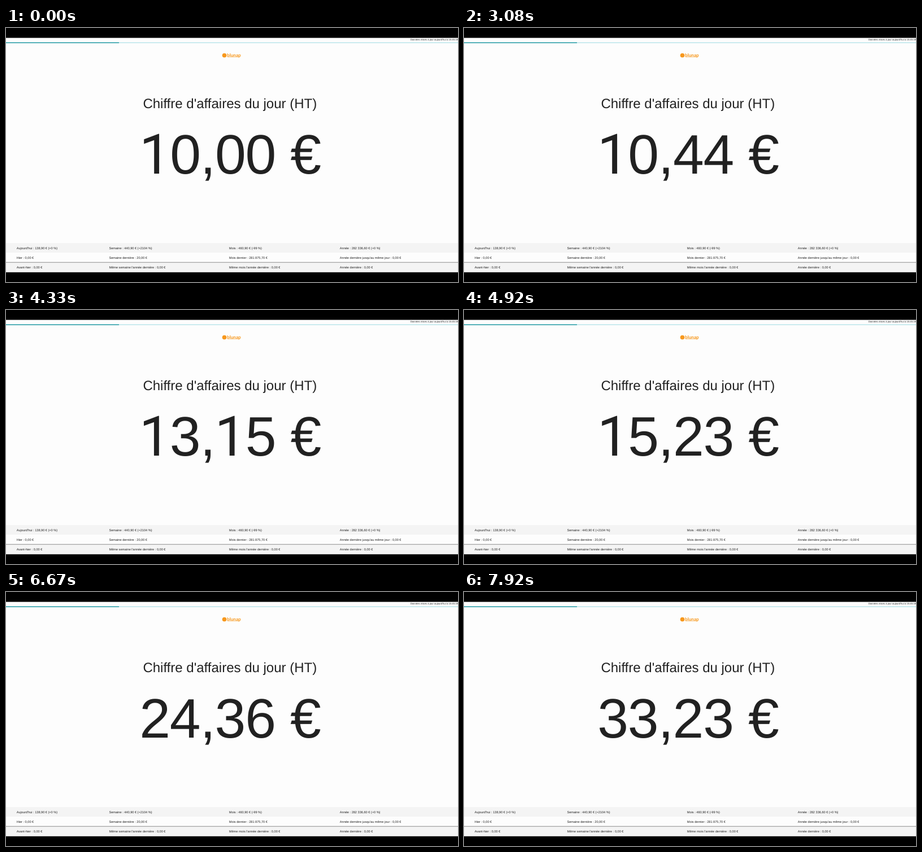
An HTML page that plays this animation: 800 px wide and 450 px high, repeating every 8000 ms.

```html
<!DOCTYPE html>
<html lang="fr">
<head>
<meta charset="utf-8">
<title>Chiffre d'affaires</title>
<style>
  html, body { margin: 0; width: 100%; height: 100%; overflow: hidden; background: #000; }
  svg { display: block; width: 800px; height: 450px; }
  text { font-family: "Liberation Sans", Arial, sans-serif; fill: #212121; text-rendering: geometricPrecision; }
  .centered { text-anchor: middle; }
  #amount { font-size: 98.5px; letter-spacing: -1.2px; }
  .one { font-family: Roboto, sans-serif; }
  #cells { font-size: 5.6px; }
  .brand { font: 700 8.2px Lato, sans-serif; fill: #f7981d; }
</style>
</head>
<body>
<svg viewBox="0 0 800 450">
  <rect y="17.5" width="800" height="415" fill="#fdfdfd"/>
  <rect y="25.4" width="800" height="1.2" fill="#a9e0e6"/>
  <rect y="25.4" width="200" height="1.4" fill="#2599a3"/>
  <text x="715.7" y="22" font-size="4.25">Données mises à jour aujourd'hui à 15:45:19</text>

  <circle cx="386.5" cy="48.5" r="3.8" fill="#f7981d"/>
  <text class="brand" x="391" y="50.5">blunap</text>
  <rect x="392" y="51.4" width="22" height=".7" fill="#f7981d" opacity=".6"/>

  <text class="centered" x="396.3" y="141.5" font-size="24">Chiffre d'affaires du jour (HT)</text>
  <text class="centered" id="amount" x="396.4" y="258.3"></text>

  <rect y="381" width="800" height="17" fill="#f4f4f4"/>
  <rect y="415" width="800" height="17.5" fill="#f4f4f4"/>
  <rect y="414.7" width="800" height="1" fill="#8c8c8c"/>
  <g id="cells"></g>
</svg>
<script>
const LOOP = 8000, FRAME = 1000 / 12;
const COUNT_START = 2335.3, COUNT_TIME = 19996, FROM = 10, TO = 138.9;

const columns = [
  [18.7, "Aujourd'hui : 138,90 € (+0 %)", "Hier : 0,00 €", "Avant-hier : 0,00 €"],
  [182.5, "Semaine : 440,90 € (+2104 %)", "Semaine dernière : 20,00 €", "Même semaine l'année dernière : 0,00 €"],
  [394.8, "Mois : 460,90 € (-99 %)", "Mois dernier : 281 875,70 €", "Même mois l'année dernière : 0,00 €"],
  [590.8, "Année : 282 336,60 € (+0 %)", "Année dernière jusqu'au même jour : 0,00 €", "Année dernière : 0,00 €"]
];
document.getElementById("cells").innerHTML = columns.map(([x, ...rows]) =>
  rows.map((label, i) => `<text x="${x}" y="${391.7 + 17 * i}">${label}</text>`).join("")
).join("");

const amount = document.getElementById("amount");

// The digit 1 has no foot, and neighbouring ones are kerned.
const styleOnes = text => text.replace(/1/g, (one, i) =>
  `<tspan class="one" dx="${text[i - 1] === "1" ? "-.074em" : 0}">1</tspan>`);

// The counter follows a slow cosine ease, sampled twelve times a second.
function draw(now) {
  const time = Math.floor((now % LOOP + 5) / FRAME) * FRAME;
  const progress = Math.max(0, time - COUNT_START) / COUNT_TIME;
  const eased = (1 - Math.cos(Math.PI * progress)) / 2;
  const value = FROM + (TO - FROM) * eased;
  amount.innerHTML = styleOnes(value.toFixed(2).replace(".", ",") + " €");
}

const start = performance.now();
function tick() {
  draw(performance.now() - start);
  requestAnimationFrame(tick);
}
tick();
</script>
</body>
</html>
```
